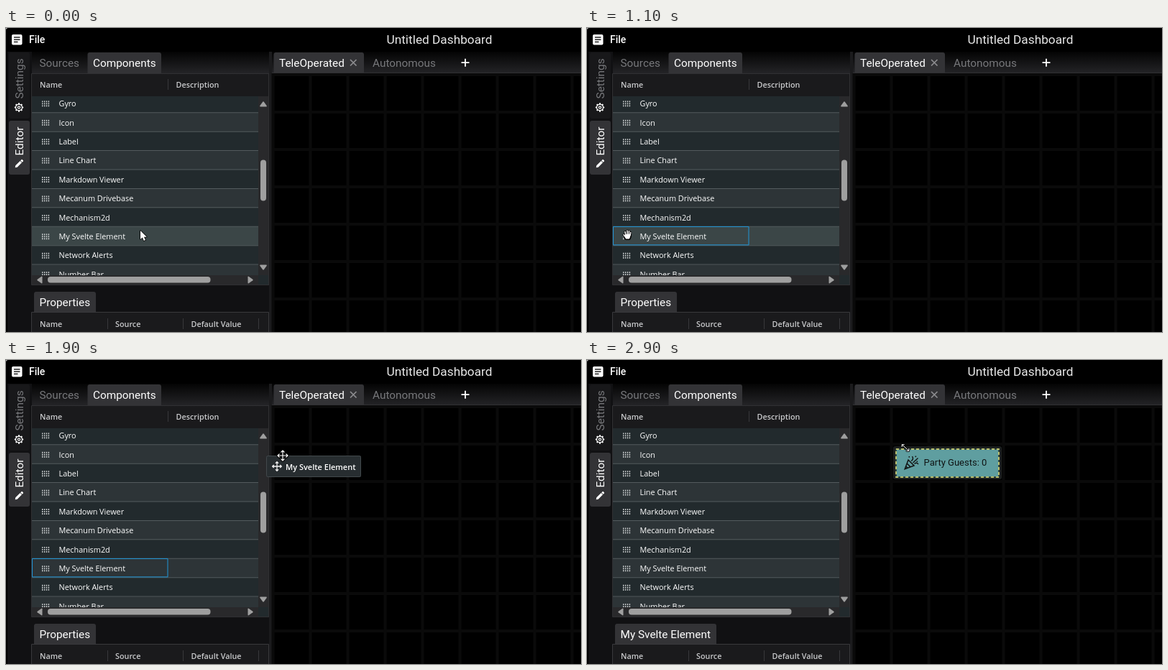
An HTML page with a canvas for the animation above (3 s loop, 800 by 423 pixels).

```html
<!DOCTYPE html>
<html lang="en">
<head>
<meta charset="utf-8">
<title>Dashboard drag and drop</title>
<style>
  html, body { margin: 0; width: 100%; height: 100%; overflow: hidden; background: #000; }
  canvas { display: block; }
</style>
</head>
<body>
<canvas id="stage" width="800" height="423"></canvas>
<script>
const ctx = document.getElementById('stage').getContext('2d');
const UI = 'Roboto, sans-serif', GRID = '"Open Sans", sans-serif';
const LOOP = 3000, STEP = 100;
const DRAG = 1300, DROP = 2200;
const ROW_TOP = 91.4, ROW_H = 26.42, PICKED = 7;
const ROWS = ['Gyro', 'Icon', 'Label', 'Line Chart', 'Markdown Viewer', 'Mecanum Drivebase',
  'Mechanism2d', 'My Svelte Element', 'Network Alerts', 'Number Bar'];
// Pointer path: time, x, y
const PATH = [[0, 187, 282], [100, 187, 282], [600, 56, 287], [1200, 56, 287], [1300, 72, 283],
  [1500, 145, 258], [1900, 385, 133], [2100, 443, 122], [LOOP, 443, 122]];

function rect(x, y, w, h, fill, radius = 0) {
  ctx.fillStyle = fill;
  ctx.beginPath();
  ctx.roundRect(x, y, w, h, radius);
  ctx.fill();
}

function frame(x, y, w, h, color, radius = 0) {
  ctx.strokeStyle = color;
  ctx.lineWidth = 1;
  ctx.beginPath();
  ctx.roundRect(x + .5, y + .5, w - 1, h - 1, radius);
  ctx.stroke();
}

function text(str, x, y, size, color, family = UI, weight = 400) {
  ctx.font = `${weight} ${size}px ${family}`;
  ctx.fillStyle = color;
  ctx.fillText(str, x, y);
}

function at(x, y, angle, draw) {
  ctx.save();
  ctx.translate(x, y);
  ctx.rotate(angle);
  draw();
  ctx.restore();
}

function stroke(path, color, width) {
  ctx.strokeStyle = color;
  ctx.lineWidth = width;
  ctx.stroke(new Path2D(path));
}

function fill(path, color) {
  ctx.fillStyle = color;
  ctx.fill(new Path2D(path));
}

function strip(x, y, w, h) {
  const shade = ctx.createLinearGradient(0, y, 0, y + h);
  shade.addColorStop(0, '#040404');
  shade.addColorStop(1, '#242427');
  rect(x, y, w, h, shade);
}

function tab(label, x, y, w, h) {
  rect(x, y, w, h, '#333336', [3, 3, 0, 0]);
  text(label, x + 7.5, y + 20, 15.35, '#fff');
}

function header(labels, y, dividers) {
  for (const [label, x] of labels) text(label, x, y + 4, 10.8, '#c9cacc', GRID, 600);
  for (const x of dividers) rect(x, y - 8, 1, 15, '#38383b');
}

function pointer(t) {
  const i = PATH.findIndex(key => key[0] > t);
  const [t0, x0, y0] = PATH[i - 1], [t1, x1, y1] = PATH[i];
  let k = (t - t0) / (t1 - t0);
  if (t < 600) k = k * k * (3 - 2 * k);
  return [x0 + (x1 - x0) * k, y0 + (y1 - y0) * k];
}

function drawTopBar() {
  fill('M0 0H3Q0 0 0 3Z', '#ddd');
  rect(8, 9, 14.5, 14.5, '#fff', 2);
  for (const [y, w] of [[12.3, 8.5], [15.5, 8.5], [18.7, 5.5]]) rect(11, y, w, 1.4, '#111');
  text('File', 32, 21, 14, '#fff', UI, 500);
  text('Untitled Dashboard', 529.5, 22, 17.25, '#e8e8e8');
}

function drawSidebar() {
  rect(2, 33, 34, 390, '#111113');
  rect(4, 34, 29, 92, '#18181a', 3);
  rect(4, 129, 29, 75, '#333336', 3);
  at(24, 98.5, -Math.PI / 2, () => text('Settings', 0, 0, 15.4, '#77787b'));
  at(24, 177.5, -Math.PI / 2, () => text('Editor', 0, 0, 15.4, '#fff'));
  at(18, 110.5, 0, () => {
    for (let i = 0; i < 8; i++) {
      ctx.rotate(Math.PI / 4);
      rect(-1, -6.2, 2, 2.2, '#fff', .5);
    }
    ctx.lineWidth = 1.2;
    ctx.strokeStyle = '#fff';
    for (const r of [4.4, 1.6]) {
      ctx.beginPath();
      ctx.arc(0, 0, r, 0, 7);
      ctx.stroke();
    }
  });
  at(18, 189, -Math.PI / 4, () => fill('M-7.5 0L-5-1.7H4V1.7H-5ZM4.8-1.7H6.6Q7.4-1.7 7.4-1V1Q7.4 1.7 6.6 1.7H4.8Z', '#fff'));
}

function drawRows(t, x, y) {
  const dragging = t >= DRAG && t < DROP;
  const inList = x < 351;
  const target = Math.floor((y - ROW_TOP) / ROW_H);
  ctx.save();
  ctx.beginPath();
  ctx.rect(36, 95, 315, 249);
  ctx.clip();
  ROWS.forEach((name, i) => {
    const top = ROW_TOP + i * ROW_H;
    const hot = i === PICKED && t < DRAG;
    const faded = i === PICKED && dragging && inList;
    rect(36, top, 315, ROW_H, hot ? '#3b4647' : i % 2 ? '#2d3437' : '#222a2d');
    rect(36, top - .6, 315, 1, '#535b5e');
    ctx.globalAlpha = faded ? .5 : 1;
    for (let dot = 0; dot < 12; dot++)
      rect(50 + dot % 4 * 2.9, top + 10 + Math.floor(dot / 4) * 3, 1.4, 1.9, '#d2d5d6');
    text(name, 73.5, top + 17.7, 10.85, '#fff', GRID, 500);
    ctx.globalAlpha = 1;
  });
  if (t >= 1000 && t < DROP) {
    ctx.globalAlpha = dragging && inList ? .6 : 1;
    frame(36, ROW_TOP + PICKED * ROW_H - .4, 189.5, ROW_H, '#2196d8');
    ctx.globalAlpha = 1;
  }
  if (dragging && inList && target !== PICKED)
    rect(36, ROW_TOP + target * ROW_H - .8, 315, 1.2, '#2196d8');
  ctx.restore();
}

function drawScrollbars() {
  rect(351, 95, 15, 249, '#29292b');
  rect(36, 344, 315, 14, '#29292b');
  rect(351, 344, 15, 14, '#222a2d');
  rect(354, 183.5, 8, 57, '#9f9f9f', 4);
  rect(58, 346, 226.5, 8.5, '#9f9f9f', 4);
  const arrows = [[358, 106, 0], [340, 350.5, 1], [358, 333, 2], [47, 350.5, 3]];
  for (const [x, y, turn] of arrows)
    at(x, y, turn * Math.PI / 2, () => fill('M-4.2 3.5Q-5.4 3.3-4.6 2L-.8-3.3Q0-4.2 .8-3.3L4.6 2Q5.4 3.3 4.2 3.5Z', '#9f9f9f'));
}

function drawLeftPanel(t, x, y) {
  rect(36, 33, 334, 390, '#111113');
  strip(36, 33, 330, 30);
  text('Sources', 46.5, 54, 15.35, '#77787b');
  tab('Components', 113.5, 34, 102.5, 29);
  rect(36, 63, 330, 1, '#39393c');
  rect(36, 64, 330, 31, '#1a1a1c');
  header([['Name', 47], ['Description', 236.5]], 79, [225]);
  drawRows(t, x, y);
  drawScrollbars();
  frame(35, 63, 331, 295, '#303033');

  const dropped = t >= DROP;
  tab(dropped ? 'My Svelte Element' : 'Properties', 39, 367, dropped ? 141 : 86, 29);
  rect(36, 396, 330, 27, '#1a1a1c');
  frame(35, 395, 331, 40, '#39393c');
  header([['Name', 47], ['Source', 152], ['Default Value', 257.5]], 412, [141, 246, 351]);
  rect(366, 33, 4, 390, '#1b1b1d');
}

function drawCanvasArea() {
  rect(370, 33, 430, 390, '#000');
  strip(370, 33, 430, 30);
  tab('TeleOperated', 372.5, 34, 125.5, 29);
  stroke('M479 44l8.5 8.5m0-8.5l-8.5 8.5', '#8d8d90', 1.7);
  text('Autonomous', 510, 54, 15.35, '#77787b');
  stroke('M633.5 48.2h11m-5.5-5.5v11', '#fff', 1.8);
  rect(370, 62, 430, 1, '#303033');
  for (let i = 0; i < 9; i++) {
    rect(369.5 + i * 52, 63, 4, 360, '#0a0a0a');
    if (i < 7) rect(370, 63 + i * 52, 430, 4, '#0a0a0a');
  }
}

function drawWidget() {
  rect(426, 120, 151, 46, '#1c1f1f', 3);
  rect(429.5, 123.5, 144, 40, '#5f9ea0');
  ctx.strokeStyle = '#26362f';
  ctx.lineWidth = 1.5;
  ctx.strokeRect(430, 124, 143, 39);
  ctx.strokeStyle = '#e3e27a';
  ctx.setLineDash([4, 3]);
  ctx.strokeRect(430, 124, 143, 39);
  ctx.setLineDash([]);
  at(441, 132, 0, () => {
    stroke('M1.2 19.8L6 7L14 15ZM4.2 12L9 16.8M2.8 16L5 18.2', '#111', 1.5);
    stroke('M10 8.5Q14 6 11.5 2M12.5 11L19.5 4.5M14.5 12.5Q17.5 10 20 13', '#111', 1.4);
    for (const [x, y] of [[6.5, 2], [15.5, 1.5], [17.5, 8.5]]) rect(x, y, 1.6, 1.6, '#111');
  });
  text('Party Guests: 0', 468.5, 147, 13, '#101414');
}

const MOVE = 'M-7 0H7M0-7V7M-4.8-2.2L-7 0L-4.8 2.2M4.8-2.2L7 0L4.8 2.2M-2.2-4.8L0-7L2.2-4.8M-2.2 4.8L0 7L2.2 4.8';

function drawGhost(x, y) {
  const lead = (x - 145) / 80;
  at(Math.round(x - 26 + lead), Math.round(y - 3 + lead), 0, () => {
    rect(0, 0, 132, 30, '#272d30', 2);
    frame(0, 0, 132, 30, '#42494c', 2);
    text('My Svelte Element', 27, 19.5, 11, '#fff', GRID, 600);
    ctx.translate(15, 15);
    ctx.scale(.9, .9);
    stroke(MOVE, '#f2f2f2', 1.4);
  });
}

function drawCursor(t, x, y) {
  ctx.lineJoin = ctx.lineCap = 'round';
  at(x, y, 0, () => {
    if (t >= DROP) {
      const resize = 'M-4.8-4.3L4.8 4.3M-4.8-1.3V-4.3H-1.8M4.8 1.3V4.3H1.8';
      stroke(resize, '#000', 2.8);
      stroke(resize, '#fff', 1);
    } else if (t >= DRAG) {
      stroke(MOVE, '#000', 3.4);
      stroke(MOVE, '#fff', 1.2);
    } else if (x < 64) {
      const fingers = 'M-2.2 1L-3-3.5M0 0V-5M2.2 0L2.5-4.5M4 1.5L4.7-2.5M-2.5 3.5L-5 .8';
      const palm = 'M-3 0H4.6L4 4L2.8 6.5H-1.8L-4 3Z';
      stroke(fingers + palm, '#000', 3.2);
      stroke(fingers, '#fff', 1.5);
      fill(palm, '#fff');
    } else {
      const arrow = 'M0 0V12L2.8 9.4L4.8 14L7 13L5 8.7H8.8Z';
      stroke(arrow, '#000', 1.6);
      fill(arrow, '#fff');
    }
  });
  ctx.lineJoin = 'miter';
  ctx.lineCap = 'butt';
}

function render(now) {
  const t = Math.floor(now % LOOP / STEP) * STEP;
  const [x, y] = pointer(t);
  rect(0, 0, 800, 423, '#000');
  drawTopBar();
  drawSidebar();
  drawLeftPanel(t, x, y);
  drawCanvasArea();
  if (t >= DROP) drawWidget();
  else if (t >= DRAG) drawGhost(x, y);
  drawCursor(t, x, y);
  requestAnimationFrame(render);
}
requestAnimationFrame(render);
</script>
</body>
</html>
```
